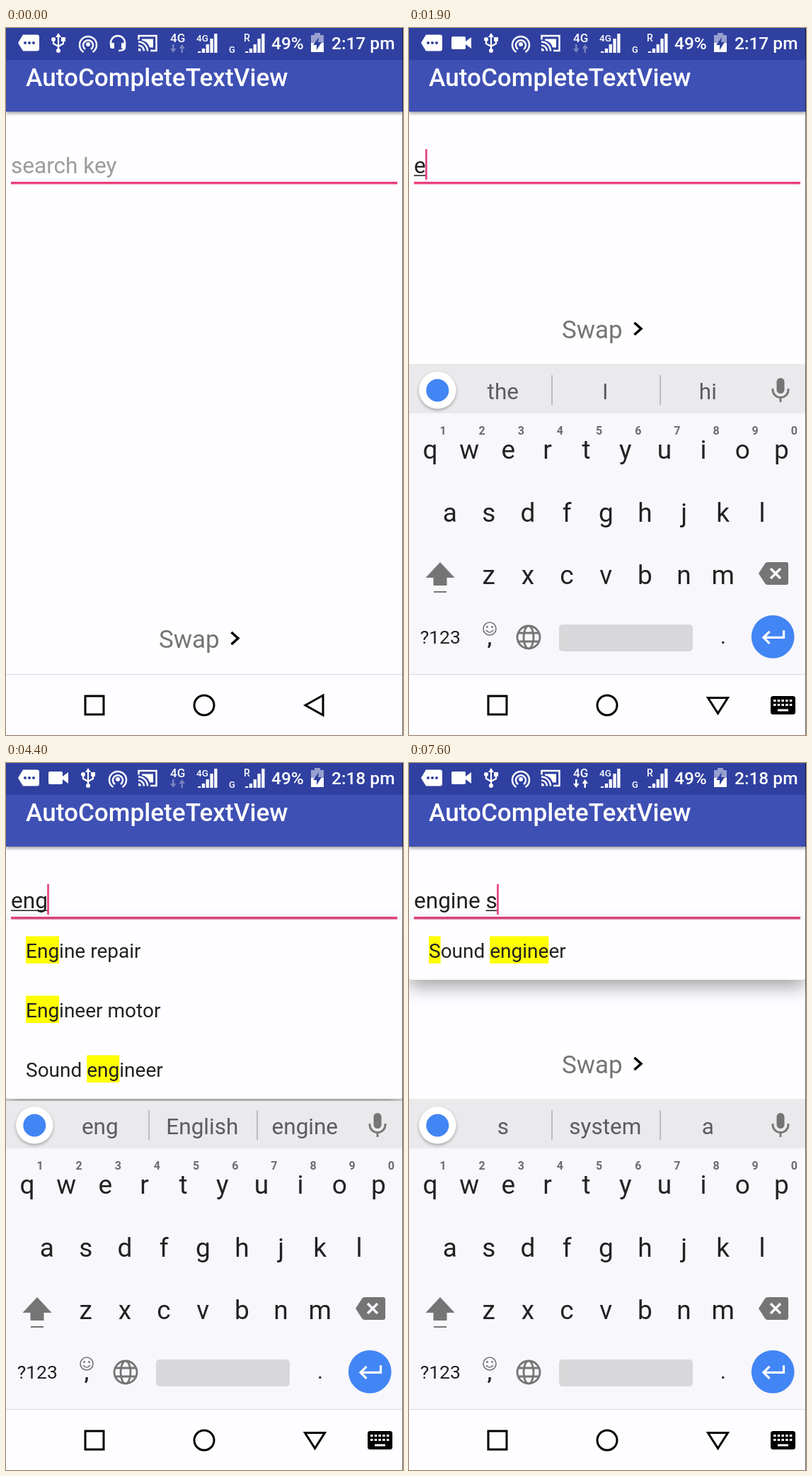
Animation of 561x998 px, one loop 8 s. Source, as an HTML page with a canvas:

```html
<!DOCTYPE html>
<html lang="en">
<head>
<meta charset="utf-8">
<title>AutoCompleteTextView</title>
<style>
html, body { margin: 0; width: 100%; height: 100%; overflow: hidden; background: #fefdff; }
canvas { display: block; }
</style>
</head>
<body>
<canvas id="stage" width="561" height="998"></canvas>
<script>
const ctx = document.getElementById('stage').getContext('2d');
const LOOP = 8000, STEP = 100, BLINK = 500;
const PAGE = '#fefdff', KEYS = '#f8f7fb', INK = '#222', GREY = '#757575', PINK = '#e8437f', STATUS = '#3040a0';

// Timelines: [start, ...values]
const EDITS = [[0, ''], [500, ''], [1800, 'e'], [2200, 'en'], [4200, 'eng'], [4500, 'engi'],
  [5300, 'engine '], [5500, 'engine s']];
const HINTS = [[0, 'the', 'I', 'hi'], [2500, 'en', 'enjoy', 'English'], [4300, 'eng', 'English', 'engine'],
  [4700, 'engi', '*engine', 'engin…ring'], [5700, 's', 'system', 'a']];
const ITEMS = ['Engine repair', 'Engineer motor', 'Sound engineer'];

const at = (list, t) => list.filter(e => e[0] <= t).pop() || list[0];
const clamp = v => Math.max(0, Math.min(1, v));

function rect(x, y, w, h, color, r = 0) {
  ctx.fillStyle = color;
  ctx.beginPath();
  ctx.roundRect(x, y, w, h, r);
  ctx.fill();
}
function disc(x, y, r, color) {
  ctx.fillStyle = color;
  ctx.beginPath();
  ctx.arc(x, y, r, 0, 7);
  ctx.fill();
}
// Path around (x, y): filled, or stroked when a line width is given
function icon(d, x, y, color, line) {
  ctx.save();
  ctx.translate(x, y);
  const path = new Path2D(d);
  if (line) {
    ctx.strokeStyle = color;
    ctx.lineWidth = line;
    ctx.stroke(path);
  } else {
    ctx.fillStyle = color;
    ctx.fill(path);
  }
  ctx.restore();
}
function font(size, weight = 400) { ctx.font = `${weight} ${size}px Roboto, sans-serif`; }
function text(s, x, y, size, color, weight, align = 'left') {
  font(size, weight);
  ctx.textAlign = align;
  ctx.fillStyle = color;
  ctx.fillText(s, x, y);
}
const centered = (s, x, y, size, color, weight) => text(s, x, y, size, color, weight, 'center');
function shadow(color, blur, y, draw) {
  ctx.save();
  ctx.shadowColor = color;
  ctx.shadowBlur = blur;
  ctx.shadowOffsetY = y;
  draw();
  ctx.restore();
}

const statusIcons = {
  tag(x) {
    icon('M-15 0L-8-11.5H12Q15-11.5 15-8.5V8.5Q15 11.5 12 11.5H-8Z', x, 21, '#fff');
    for (const dx of [-5, 1, 7]) disc(x + dx, 21, 2, STATUS);
  },
  video(x) { icon('M-14-7Q-14-9-12-9H4Q6-9 6-7V-2L14-8V8L6 2V7Q6 9 4 9H-12Q-14 9-14 7Z', x, 21, '#fff'); },
  usb(x) {
    icon('M0-9V10M0 5L-7 1V-4M0 5L7 1V-5', x, 21, '#fff', 2.2);
    icon('M0-14L4-8H-4ZM4-8H10V-2H4Z', x, 21, '#fff');
    disc(x - 7, 16, 3, '#fff');
    disc(x, 32, 3, '#fff');
  },
  hotspot(x) {
    disc(x, 23, 3, '#fff');
    icon('M-4 8A7 7 0 1 1 4 8M-6.5 12A12 12 0 1 1 6.5 12', x, 22, '#fff', 2.5);
  },
  headset(x) {
    icon('M-10 2V0A10 10 0 0 1 10 0V6Q10 11 1 11', x, 21, '#fff', 2.5);
    icon('M-11 0H-5V8H-8Q-11 8-11 5ZM5 0H11V5Q11 8 8 8H5Z', x, 21, '#fff');
  },
  cast(x) {
    icon('M-12.5-5V-10.5H12.5V10.5H4M-13 3A8 8 0 0 1-5 11M-13-2A13 13 0 0 1 0 11', x, 21.5, '#fff', 2.5);
    icon('M-13 7A4 4 0 0 1-9 11H-13ZM-8-6H8V6H3Q0-3-8-4Z', x, 21.5, '#fff');
  }
};
function signal(label, x, size) {
  [2, 6, 12, 20, 27].forEach((h, i) => rect(x + 2 + i * 5.8, 35 - h, 4.3, h, '#fff'));
  rect(x - 1, 7, 17, 14, STATUS);
  text(label, x, 18.5, size, '#fff', 500);
}

function drawHeader(t) {
  shadow('rgba(0,0,0,.45)', 5, 2, () => rect(0, 0, 561, 118, '#3f50b4'));
  rect(0, 0, 561, 45, STATUS);
  const names = t < 100 ? ['tag', 'usb', 'hotspot', 'headset', 'cast'] : ['tag', 'video', 'usb', 'hotspot', 'cast'];
  names.forEach((name, i) => statusIcons[name](32 + i * 42));

  const active = (t >= 500 && t < 1500) || t >= 7600;
  text('4G', 232, 20, 17, '#fff', 500);
  icon('M-7.5-6H-5V0H-2L-6.2 6L-10.5 0H-7.5ZM5 6H7.5V0H10.5L6.2-6L2 0H5Z', 242.5, 29,
    active ? '#fff' : 'rgba(255,255,255,.35)');
  signal('4G', 269, 13.5);
  text('G', 315, 35, 13, '#fff', 500);
  signal('R', 336, 14);
  text('49%', 375, 30, 24.5, '#fff', 500);
  rect(436, 7, 8, 4, '#98a0d0');
  rect(431, 10, 18, 11, '#98a0d0');
  rect(431, 21, 18, 13, '#fff');
  icon('M2-8L-6 3H-1V10L6-1H1Z', 440, 21, STATUS);
  text(t < 2900 ? '2:17 pm' : '2:18 pm', 460, 30, 24.5, '#fff', 500);
  text('AutoCompleteTextView', 28, 82, 35.15, '#fff', 500);
}

function drawField(t) {
  const [since, value] = at(EDITS, t);
  rect(7, 217, 546, 3.5, PINK);
  font(31.55);
  const width = ctx.measureText(value).width;
  if (value) {
    const start = value.lastIndexOf(' ') + 1;
    const before = ctx.measureText(value.slice(0, start)).width;
    text(value, 7, 205, 31.55, INK);
    rect(7 + before, 207.5, width - before, 1.6, INK);
  } else {
    text('search key', 7, 205, 31.55, '#9c9c9c');
  }
  if (t >= 500 && Math.floor((t - since) / BLINK) % 2 === 0) rect(Math.max(7, 6.3 + width), 171, 2.7, 43, PINK);
}

function drawSwap(y) {
  text('Swap', 216, y + 12, 35, GREY);
  icon('M-5.5-9L4-.5L-5.5 8', 324, y - 1, '#000', 3.5);
}

function drawDropdown(t) {
  const query = at(EDITS, t - 200)[1];
  if (query.length < 2) return;
  const patterns = query.trim().split(' ').map(word => new RegExp('\\b' + word, 'i'));
  const rows = ITEMS.filter(item => patterns.every(p => p.test(item)));
  ctx.save();
  ctx.globalAlpha = clamp((t - 2300) / 300);
  ctx.beginPath();
  ctx.rect(0, 120, 561, 357);
  ctx.clip();
  shadow('rgba(0,0,0,.36)', 26, 10, () => rect(0, 222, 560, rows.length * 84, PAGE, 4));
  rows.forEach((item, i) => {
    const y = 275 + i * 84;
    font(28);
    for (const p of patterns) {
      const m = item.match(p);
      rect(28 + ctx.measureText(item.slice(0, m.index)).width, y - 30.5, ctx.measureText(m[0]).width, 38.5, '#ff0');
    }
    text(item, 28, y, 28, INK);
  });
  ctx.restore();
}

function drawSuggestions(t) {
  rect(0, 474, 561, 70, '#eae9ec');
  shadow('rgba(0,0,0,.3)', 4, 2, () => disc(40.3, 511.3, 26.3, '#fff'));
  disc(40.3, 511.5, 16, '#4285f4');
  rect(201, 490, 2, 42, '#bcbcbe');
  rect(354, 490, 2, 42, '#bcbcbe');
  at(HINTS, t).slice(1).forEach((word, i) => {
    const bold = word[0] === '*', condensed = word.includes('…');
    ctx.save();
    ctx.translate([132.8, 277.3, 422.3][i], 523.7);
    if (condensed) ctx.scale(.7, 1);
    centered(word.replace('*', ''), condensed ? -8 : 0, 0, 31.5, bold ? INK : '#5c5c5e', bold ? 700 : 400);
    ctx.restore();
  });
  rect(519.5, 494, 11, 22, GREY, 5.5);
  icon('M-11-2V0A11 10.5 0 0 0 11 0V-2M0 11V17', 525, 511, GREY, 2.8);
}

function drawKeyboard(t) {
  const u = clamp((t - 700) / 400);
  ctx.save();
  ctx.globalAlpha = clamp(u * 1.2);
  ctx.translate(0, 252 * (1 - u) ** 2);
  rect(0, 544, 561, 370, KEYS);
  drawSuggestions(t);

  [['qwertyuiop', 30], ['asdfghjkl', 57.7], ['zxcvbnm', 112.7]].forEach(([row, x], r) =>
    [...row].forEach((key, i) => centered(key, x + i * 55.15, 608 + r * 88.5, 37, INK)));
  [...'1234567890'].forEach((n, i) => centered(n, 48 + i * 55.15, 574, 16, '#6c6c6e', 700));

  icon('M0-20L20.5 2H9.5V13H-9.5V2H-20.5Z', 44, 774, GREY);
  rect(35, 795, 18, 2, GREY);
  icon('M-21 0L-12-14Q-11-16-8-16H18Q21-16 21-13V13Q21 16 18 16H-8Q-11 16-12 14Z', 515, 770, GREY);
  icon('M-7-7L7 7M7-7L-7 7', 518, 770, KEYS, 3.5);

  centered('?123', 44.3, 869, 26.5, INK);
  icon('M9 0A9 9 0 1 1-9 0A9 9 0 1 1 9 0M-5 2Q0 8 5 2', 114, 848, GREY, 1.6);
  disc(110.5, 845.5, 1.4, GREY);
  disc(117.5, 845.5, 1.4, GREY);
  centered(',', 114, 870, 28, INK, 700);
  icon('M16 0A16 16 0 1 1-16 0A16 16 0 1 1 16 0M7 0A7 16 0 1 1-7 0A7 16 0 1 1 7 0M-14-6H14M-14 6H14',
    169, 860, GREY, 2.8);
  const pressed = t >= 5100 && t < 5300;
  rect(212, 842, 189, 38, pressed ? '#b5b5b6' : '#d8d8da', 5);
  centered('.', 444, 869, 30, INK);
  disc(514.2, 859.3, 30.4, '#4285f4');
  icon('M15-9V1H-13M-5-7.5L-13.5 1L-5 9.5', 514.5, 859.3, '#fff', 3.2);
  ctx.restore();
}

function drawNav(open) {
  rect(0, 912, 561, 86, PAGE);
  rect(0, 912, 561, 1.2, '#dddce0');
  icon('M-13-13H13V13H-13Z', 125, 956, '#000', 3);
  icon('M14 0A14 14 0 1 1-14 0A14 14 0 1 1 14 0Z', 280, 956, '#000', 3);
  if (!open) {
    icon('M-13 0L12-14V14Z', 436, 956, '#000', 3);
    return;
  }
  icon('M-14-11H14L0 11Z', 436.5, 956.5, '#000', 3);
  rect(511, 943, 35, 26, '#000', 3.5);
  for (let i = 0; i < 5; i++) {
    rect(515 + i * 5.7, 948, 3.5, 3, '#fff');
    rect(515 + i * 5.7, 954, 3.5, 3, '#fff');
  }
  rect(521, 961.5, 15, 3, '#fff');
}

function draw(now) {
  const t = Math.floor(now % LOOP / STEP) * STEP;
  const open = t >= 700;
  rect(0, 0, 561, 998, PAGE);
  drawHeader(t);
  drawField(t);
  drawSwap(open ? 426 : 863);
  if (open) drawKeyboard(t);
  drawDropdown(t);
  drawNav(open);
  rect(560, 0, 1, 998, 'rgba(0,0,0,.6)');
}

let start;
function frame(now) {
  start ??= now;
  draw(now - start);
  requestAnimationFrame(frame);
}
requestAnimationFrame(frame);
</script>
</body>
</html>
```
